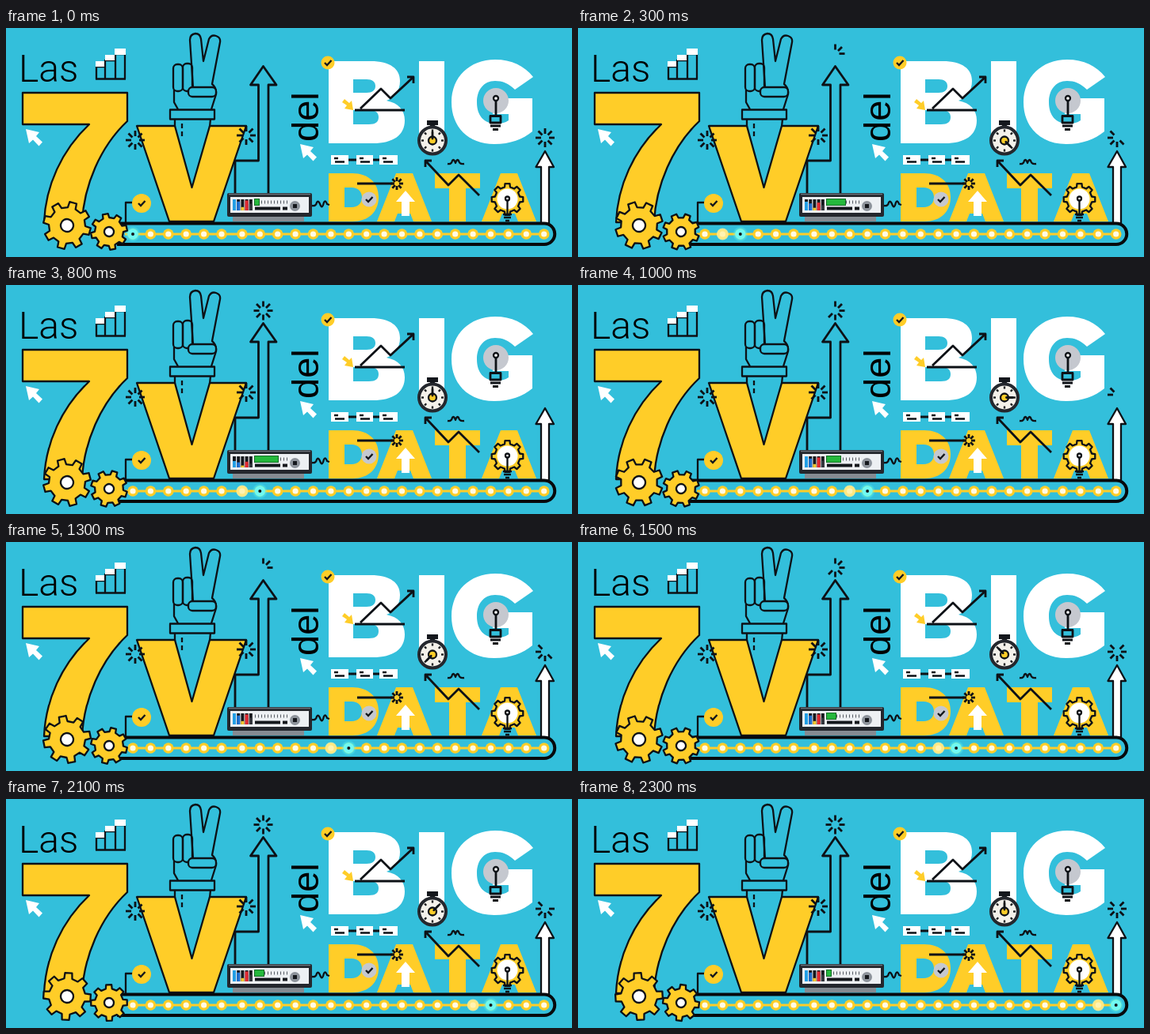
Recreate the animation shown at these times as an HTML page. Size 714 by 290 pixels, loop 2400 ms.

```html
<!DOCTYPE html>
<html lang="es">
<head>
<meta charset="utf-8">
<title>Las 7 V del Big Data</title>
<style>
  html, body { margin: 0; width: 100%; height: 100%; overflow: hidden; background: #33bfdb; }
  svg { display: block; width: 714px; height: 290px; }
  .thin { font: 300 48px Roboto, sans-serif; }
  .plain { font: 47px "Liberation Sans", Arial, sans-serif; }
  .ink { fill: none; stroke: #0d1116; stroke-width: 2.3; stroke-linejoin: round; }
  .bold { stroke-width: 2.8; }
  .y { fill: #ffcd28; }
  .w { fill: #fff; }
  .bg { fill: #33bfdb; }
  .k { fill: #14171c; }
</style>
</head>
<body>
<svg viewBox="0 0 714 290">
  <defs>
    <path id="cursor" class="w" d="M0 0L17 4L13 9L21 16.5L16.5 21.5L9 13.5L4 18Z"/>
    <path id="check" fill="none" stroke="#14171c" stroke-width="2.4" d="M-4 0L-1 3L4.500 -3"/>
    <path id="letterA" class="y" d="M24 0H45L69 61H46L42 51H26L22 61H0Z"/>
    <radialGradient id="halo">
      <stop offset=".5" stop-color="#5ffcf4" stop-opacity=".8"/>
      <stop offset="1" stop-color="#5ffcf4" stop-opacity="0"/>
    </radialGradient>
  </defs>
  <rect class="bg" width="714" height="290"/>

  <!-- title -->
  <text class="thin" x="16" y="67.5">Las</text>
  <text class="plain" transform="translate(394 144) rotate(-90)">del</text>
  <path class="ink" d="M114 64.5V49H125V64.5M125 64.5V41H138V64.5M138 64.5V33H150V64.5M113 64.5H151"/>
  <path class="w" d="M113 42h11v7h-11zM125 34h12v7h-12zM137 26h14v8h-14z"/>
  <path class="ink y" d="M21 82H153V118C119 150 98 200 96 246H48C50 200 70 155 105 122H21Z"/>
  <use href="#cursor" x="25" y="128"/>
  <use href="#cursor" x="371" y="147"/>

  <!-- hand and V -->
  <path class="ink y" d="M165 124H213L234.5 202L257 124H303L262 245H206Z"/>
  <g class="ink">
    <path d="M213 115V125M258 115L257 125"/>
    <path d="M222 121V140" stroke-dasharray="6 4"/>
    <path d="M236 76L232 15Q232 8 239 7Q245 7 246 14L249 42L256 14Q259 8 265 10Q271 12 270 18L260 71Q266 76 265 84L259 103M212 78V94L217 103"/>
    <rect x="211" y="46" width="12" height="34" rx="5"/>
    <rect x="223" y="45" width="12" height="35" rx="5"/>
    <rect class="bg" x="230" y="75" width="35" height="12" rx="5"/>
    <rect x="207" y="103.5" width="56" height="12"/>
    <path class="bold" d="M289 209V168H318.5V72H308.500L324.5 48.500L341 72H331V209"/>
  </g>

  <!-- BIG -->
  <g class="w" fill-rule="evenodd">
    <path d="M407 42H460C485 42 497 52 497 67C497 80 490 88 480 92C495 95 503 104 503 117C503 136 488 146 463 146H407ZM438 65V82H455C462 82 466 79 466 73.5C466 68 462 65 455 65ZM438 104V122H458C466 122 470 119 470 113C470 107 466 104 458 104Z"/>
    <path d="M521 42H553V146H521Z"/>
    <path d="M665 62L642 78C634 70 626 67 617 67C602 67 594 79 594 94C594 111 603 121 618 121C624 121 630 120 634 117V109H614V89H664V131C652 141 636 147 616 147C583 147 562 125 562 94C562 62 585 40 617 40C638 40 654 48 665 62Z"/>
  </g>
  <circle class="y" cx="406" cy="44" r="8.5"/>
  <use href="#check" x="406" y="44"/>
  <path class="y" d="M438 104L427 102L430 98L424 94L427 90L433 95L436 92Z"/>
  <path class="ink bold" d="M440 104H503M447 102L473 77L485 89L514 62M506 62H514V70"/>
  <circle cx="618" cy="92" r="16" fill="#c5c8cf"/>
  <path class="ink bold" d="M618 92V112M611 111.5H624V120H611ZM611 124H624M614 128.5H621"/>
  <circle class="ink w" cx="618" cy="89" r="3"/>

  <!-- stopwatch -->
  <path class="k" d="M531 117H545V123H541V127H535V123H531Z"/>
  <circle cx="538" cy="142.5" r="17" fill="#f4f1ea" stroke="#24272d" stroke-width="4"/>
  <g id="ticks" class="ink"></g>
  <circle class="ink y" cx="538" cy="142.5" r="5"/>
  <path id="hand" class="ink bold" stroke-linecap="round" d="M538 140V132"/>

  <!-- DATA -->
  <path class="ink bold" d="M411 167H494"/>
  <path class="w" d="M410 161h22v12h-22zM442 161h21v12h-21zM471 161h23v12h-23z"/>
  <path class="ink" d="M414 165h5M415 169.5h12M446 165h5M447 169.5h12M475 165h5M476 169.5h12"/>
  <path class="ink" d="M557 172Q562 173 563 168Q565 165 567 171Q569 165 571 168Q572 173 578 172"/>
  <path class="y" fill-rule="evenodd" d="M407 184H437C457 184 470 196 470 214C470 233 457 245 437 245H407ZM427 202V227H436C444 227 449 222 449 214.5C449 207 444 202 436 202Z"/>
  <use href="#letterA" x="468" y="184"/>
  <path class="y" d="M541 184H598V203H580V245H559V203H541Z"/>
  <use href="#letterA" x="600" y="184"/>
  <path class="w" d="M504 206L516 220H509V238H499V220H492Z"/>
  <path class="ink bold" d="M443 197H490M529 168L558 199L571 186L597 212M529 176V168H537"/>
  <circle cx="458" cy="217" r="9.5" fill="#c5c8cf"/>
  <use href="#check" x="458" y="217"/>
  <path id="cog" class="ink y" transform="translate(632.5 217)"/>
  <circle class="w" cx="632.5" cy="216.5" r="13"/>
  <path class="ink" d="M632.5 219V235M627 236H638M628 240H637M630 244H635"/>
  <circle class="ink" cx="632.5" cy="216" r="2.5"/>
  <path class="ink w" d="M675 247V176H668.5L680 156L691 176H685V247"/>

  <!-- device -->
  <path fill="#858b92" d="M286 237H376V245H286Z"/>
  <rect x="279" y="209" width="107" height="30" rx="2" fill="#24272d"/>
  <path d="M281 210.5H384" stroke="#6d737b" stroke-width="1.5"/>
  <rect x="283" y="214" width="99" height="20" fill="#edf0f3"/>
  <g id="bars"></g>
  <path d="M314 220.5H357" stroke="#555b63" stroke-width="4" stroke-dasharray="1 3"/>
  <rect id="led" x="313.5" y="216.5" height="8" fill="#25b83c" stroke="#146b27"/>
  <path class="k" d="M314 226.5h32v4h-32zM349 226.5h6v4h-6z"/>
  <circle cx="364.5" cy="225.5" r="6.5" fill="#8d939b"/>
  <rect class="k" x="362" y="223" width="5" height="5"/>
  <path class="ink" d="M386 225Q391 226 392 221Q394 217 397 225Q399 229 401 221Q403 217 405 223L408 224"/>

  <!-- belt -->
  <path class="ink" d="M151 250V221H162"/>
  <circle class="y" cx="171" cy="222" r="12"/>
  <use href="#check" x="171" y="222"/>
  <path class="bg" stroke="#07090c" stroke-width="4" d="M140 247.5H679A13 13 0 0 1 679 274H140"/>
  <path d="M150 261H680" stroke="#ffcd28" stroke-width="3"/>
  <g id="dots"></g>
  <circle id="trail" cy="261" r="7.5" fill="#fff0a0" opacity=".75"/>
  <g id="lit">
    <circle r="10" fill="url(#halo)"/>
    <circle r="6.5" fill="#6ffaf3"/>
    <circle class="k" r="2"/>
  </g>

  <g id="gearA"><path class="ink y"/><circle class="ink w" r="8"/></g>
  <g id="gearB"><path class="ink y"/><circle class="ink w" r="6"/></g>
  <g id="bursts" class="ink bold"></g>
</svg>
<script>
const LOOP = 2400, STEP = 100, GREEN = 6;
const $ = id => document.getElementById(id);

function add(parent, tag, attrs) {
  const el = document.createElementNS("http://www.w3.org/2000/svg", tag);
  for (const name in attrs) el.setAttribute(name, attrs[name]);
  return parent.appendChild(el);
}

const show = (el, on) => el.style.display = on ? "" : "none";

// Outline of a gear around the origin, one tooth pointing up.
function gearPath(teeth, root, tip) {
  const pitch = 2 * Math.PI / teeth, points = [];
  for (let n = 0; n < teeth; n++) {
    for (const [off, r] of [[-.28, root], [-.19, tip], [.19, tip], [.28, root]]) {
      const a = (n + off) * pitch;
      points.push((r * Math.sin(a)).toFixed(2) + " " + (-r * Math.cos(a)).toFixed(2));
    }
  }
  return "M" + points.join("L") + "Z";
}

// Eight rays, numbered clockwise from the top.
function burst(parent, x, y, inner, outer) {
  return Array.from({ length: 8 }, (_, n) => add(parent, "path", {
    d: `M0 ${-inner}V${-outer}`, transform: `translate(${x} ${y}) rotate(${n * 45})`
  }));
}

// Linear value between [step, value] pairs.
function between(keys, at) {
  const n = Math.max(1, keys.findIndex(k => k[0] >= at));
  const [a, from] = keys[n - 1], [b, to] = keys[n];
  return from + (to - from) * (at - a) / (b - a);
}

// The belt has one wider gap after the sixth dot.
const dotX = n => 160 + n * 22.4 + (n > 5 ? 3.5 : 0);
for (let n = 0; n < 24; n++) {
  add($("dots"), "circle", { cx: dotX(n), cy: 261, r: 6.8, fill: "#ffcd28" });
  add($("dots"), "circle", { cx: dotX(n), cy: 261, r: 3.6, fill: "#fffbe6" });
}

burst($("ticks"), 538, 142.5, 11, 14);
burst($("bursts"), 163, 142, 5, 12);
burst($("bursts"), 303, 136, 5, 12);
burst($("bursts"), 493, 197, 3, 8);
const raysTop = burst($("bursts"), 324.5, 32.5, 5, 12);
const raysSide = burst($("bursts"), 680, 139, 5, 12);

$("cog").setAttribute("d", gearPath(8, 16, 20));
$("gearA").firstChild.setAttribute("d", gearPath(8, 23, 30));
$("gearB").firstChild.setAttribute("d", gearPath(8, 18, 23));

const barScale = [1, .8, .3, .9, .6];
const bars = ["#249fe5", "#1d70cf", "#f2c62e", "#e32931", "#33373e"].map((fill, n) => {
  const x = 286 + n * 5.2;
  add($("bars"), "rect", { x, y: 217, width: 4, height: 14, fill: "#14171c" });
  return add($("bars"), "rect", { x, width: 4, fill });
});

const ledKeys = [[0, 1], [6, 7], [13, 0], [18, 5], [22, 1], [24, 1]];
const topKeys = [[0, 0], [8, 8], [13, 3], [17, 8], [24, 8]];
const sideKeys = [[0, 8], [8, 0], [16, 8], [17, 8], [20, 5], [22, 7], [24, 7]];
const handKeys = [[0, 0], [17, 765], [21, 1125], [23, 1440]];

function draw(i) {
  const spin = i * 18.75;
  $("gearA").setAttribute("transform", `translate(77 250) rotate(${15 + spin})`);
  $("gearB").setAttribute("transform", `translate(130 258) rotate(${33 - spin})`);
  $("hand").setAttribute("transform", `rotate(${between(handKeys, i)} 538 142.5)`);

  const at = i < 22 ? Math.max(0, i - 1) : i;
  $("lit").setAttribute("transform", `translate(${dotX(at)} 261)`);
  $("trail").setAttribute("cx", dotX(at - 1));
  show($("trail"), at > 0);

  const level = Math.round(between(ledKeys, i));
  $("led").setAttribute("width", level * GREEN);
  show($("led"), level > 0);
  const dip = Math.max(0, 1 - Math.abs(i - 6) / 4);
  bars.forEach((bar, n) => {
    const h = 14 * barScale[n] * (1 - .85 * dip);
    bar.setAttribute("height", h);
    bar.setAttribute("y", 231 - h);
  });

  const top = Math.round(between(topKeys, i)), side = Math.round(between(sideKeys, i));
  raysTop.forEach((ray, n) => show(ray, n < top));
  // These run anticlockwise from the upper left.
  raysSide.forEach((ray, n) => show(ray, 7 - n < side));
}

let last = -1;
const start = performance.now();
function tick() {
  const i = Math.floor((performance.now() - start) % LOOP / STEP);
  if (i !== last) draw(last = i);
  requestAnimationFrame(tick);
}
tick();
</script>
</body>
</html>
```
